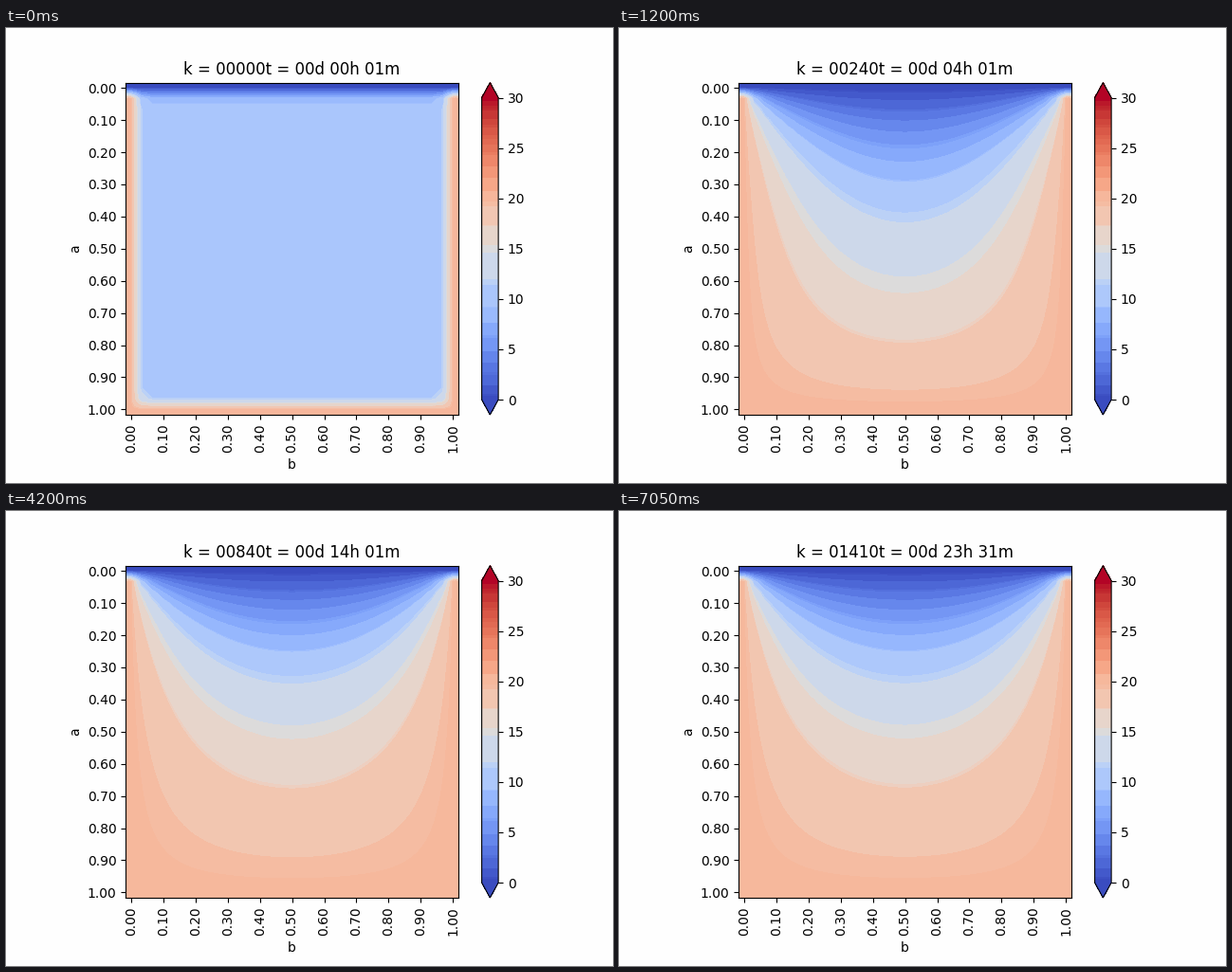
These frames come from a looping animation (640x480 px, 7.2 s). A matplotlib script:

```python
import numpy as np
import matplotlib.pyplot as plt
from matplotlib.animation import FuncAnimation
from matplotlib.colors import ListedColormap

N = 31            # grid points per side
FRAMES = 48
MINUTES = 30      # simulated minutes per frame
RATE = 0.15       # diffusion number of one half-minute step
T_MAX = 30


def start_field():
    u = np.full((N, N), 10.0)
    u[:, [0, -1]] = 20
    u[-1] = 20
    u[0] = 0
    return u


def step(u):
    v = u.copy()
    v[1:-1, 1:-1] += RATE * (u[:-2, 1:-1] + u[2:, 1:-1] + u[1:-1, :-2]
                             + u[1:-1, 2:] - 4 * u[1:-1, 1:-1])
    return v


def simulate():
    u = step(start_field())
    fields = [u]
    for _ in range(FRAMES - 1):
        for _ in range(2 * MINUTES):
            u = step(u)
        fields.append(u)
    return fields


# The smooth colour map is reduced to coarse RGB cells (3, 4 and 3 bits).
BASE = (plt.get_cmap("coolwarm")(np.arange(256))[:, :3] * 255).astype(int)
CELL = ((BASE[:, 0] >> 5) << 7) | ((BASE[:, 1] >> 4) << 3) | (BASE[:, 2] >> 5)

# Bilinear weights used to count how often each colour is visible.
pos = np.clip((np.arange(350) + 0.5) / 350 * N - 0.5, 0, N - 1)
HAT = np.maximum(0, 1 - np.abs(pos[:, None] - np.arange(N)))
BAR = np.full(256, 20.0)
BAR[[0, -1]] += 128


def banded_cmap(u):
    index = (HAT @ u @ HAT.T / T_MAX * 256).astype(int).clip(0, 255)
    weight = BAR + np.bincount(index.ravel(), minlength=256)
    colors = np.empty((256, 3))
    for cell in np.unique(CELL):
        m = CELL == cell
        colors[m] = np.floor(np.average(BASE[m], axis=0, weights=weight[m]))
    return ListedColormap((colors + 0.5) / 255.5)


def caption(k):
    t = k + 1
    return f"k = {k:05d}t = {t // 1440:02d}d {t // 60 % 24:02d}h {t % 60:02d}m"


fields = simulate()
cmaps = [banded_cmap(u) for u in fields]

fig, ax = plt.subplots(figsize=(6.4, 4.8), dpi=100, facecolor="#fefefe")
fig.subplots_adjust(bottom=0.15)
im = ax.imshow(fields[0], cmap=cmaps[0], vmin=0, vmax=T_MAX,
               interpolation="bilinear", interpolation_stage="data")
fig.colorbar(im, ax=ax, extend="both")

ticks = np.arange(0, N, 3)
labels = [f"{i / (N - 1):.2f}" for i in ticks]
ax.set_xticks(ticks, labels, rotation=90)
ax.set_yticks(ticks, labels)
ax.set_xlabel("b")
ax.set_ylabel("a")
title = ax.set_title(caption(0))


def update(i):
    im.set_data(fields[i])
    im.set_cmap(cmaps[i])
    title.set_text(caption(i * MINUTES))
    return im, title


anim = FuncAnimation(fig, update, frames=FRAMES, interval=150,
                     repeat=True, repeat_delay=0, blit=False)
plt.show()
```
